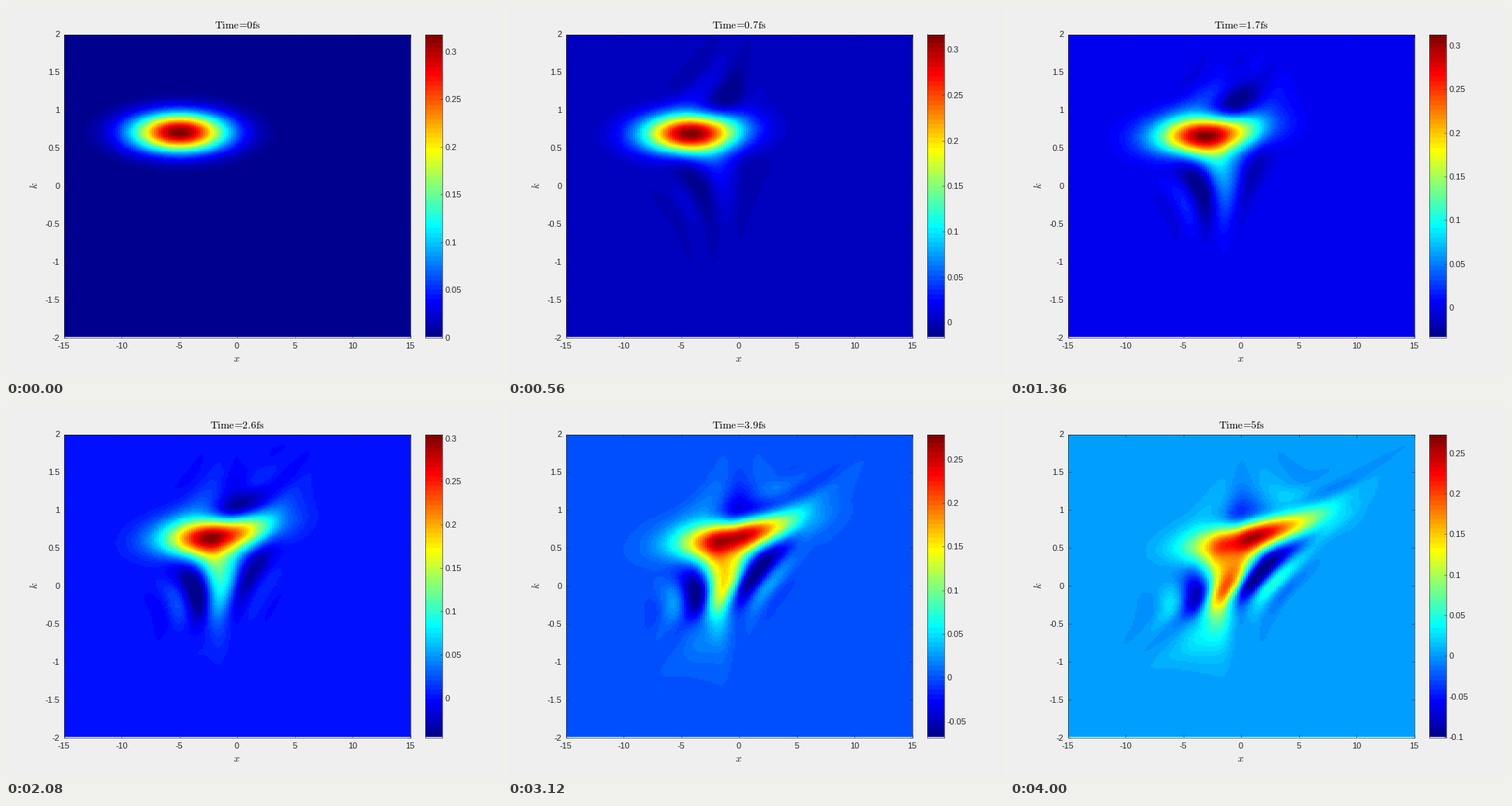
Write a matplotlib script that moves like this. It is 640 px wide and 480 px high and loops after 4080 ms.

```python
import numpy as np
import matplotlib.pyplot as plt
from matplotlib.animation import FuncAnimation
from matplotlib.colors import ListedColormap

W, H, DPI = 640, 480, 100
FRAMES, STEP_MS = 51, 80
INK = (0.15, 0.15, 0.15)


def pt(px):
    return px * 72 / DPI


plt.rcParams.update({
    "font.family": "Liberation Sans",
    "font.size": pt(11),
    "mathtext.fontset": "cm",
    "axes.unicode_minus": False,
    "axes.linewidth": pt(0.6),
    "axes.edgecolor": INK,
})

# Wave packet in nm and fs, effective mass 0.067, smooth barrier in eV
HBAR = 0.6582
C = 0.115768 / 0.067
A, X0, K0 = 4.0, -5.0, 0.7
HEIGHT, SIGMA = 0.36, 0.85
N, DX = 1024, 0.1
SUB = 20
DT = 0.1 / SUB

x = (np.arange(N) - N // 2) * DX
q = 2 * np.pi * np.fft.fftfreq(N, DX)
barrier = HEIGHT * np.exp(-x**2 / (2 * SIGMA**2))
half_v = np.exp(-0.5j * barrier * DT / HBAR)
kinetic = np.exp(-0.5j * C * q**2 * DT)

# Phase-space cells: 0.2 wide, 0.02 high
cols = np.arange(363, 363 + 300, 2)
k = np.arange(-1.99, 2, 0.02)
lag = np.arange(251)
wave = np.exp(-2j * DX * np.outer(lag, k)) * (2 * DX / np.pi)
wave[0] /= 2
ahead = cols[:, None] + lag
behind = cols[:, None] - lag


def wigner(psi):
    pairs = psi[ahead] * psi[behind].conj()
    return (pairs @ wave).real.T


def evolve():
    psi = np.exp(-(x - X0)**2 / (2 * A**2) + 1j * K0 * x)
    psi /= np.sqrt(A * np.sqrt(np.pi))
    out = [wigner(psi)]
    for _ in range(FRAMES - 1):
        for _ in range(SUB):
            psi = half_v * np.fft.ifft(kinetic * np.fft.fft(half_v * psi))
        out.append(wigner(psi))
    return out


fields = evolve()

# Colour range over time
knots = [0, 0.7, 1.7, 2.6, 3.4, 4.3, 5]
times = np.arange(FRAMES) / 10
lows = np.interp(times, knots,
                 [0, -0.0162, -0.0342, -0.0451, -0.0553, -0.0789, -0.1004])
highs = np.interp(times, knots,
                  [0.3183, 0.317, 0.3129, 0.3045, 0.2877, 0.2715, 0.273])


def ramp(up, down):
    i = np.arange(64)
    return np.clip(np.minimum((i - up) / 16, (down - i) / 16), 0, 1)


jet = ListedColormap(np.column_stack([ramp(23, 71), ramp(7, 55), ramp(-9, 39)]))

fig = plt.figure(figsize=(W / DPI, H / DPI), dpi=DPI, facecolor=(0.937,) * 3)


def panel(left, top, right, bottom):
    return fig.add_axes([left / W, 1 - bottom / H,
                         (right - left) / W, (bottom - top) / H])


def label(px, py, text, size, **kw):
    return fig.text(px / W, 1 - py / H, text, fontsize=pt(size),
                    ha="center", va="center", **kw)


ax = panel(74.5, 36.5, 521.5, 427.5)
img = ax.imshow(fields[0], cmap=jet, origin="lower", aspect="auto",
                extent=(-15, 15, -2, 2), interpolation="nearest")
xt = np.arange(-15, 16, 5)
yt = np.arange(-2, 2.1, 0.5)
ax.set_xticks(xt, [f"{v:g}" for v in xt])
ax.set_yticks(yt, [f"{v:g}" for v in yt])
ticks = dict(direction="in", color=INK, labelcolor=INK, width=pt(0.5))
ax.tick_params(axis="x", top=True, length=pt(4), pad=pt(7), **ticks)
ax.tick_params(axis="y", right=True, length=pt(4), pad=pt(5), **ticks)

bar = panel(540.5, 36.5, 562.5, 427.5)
strip = bar.imshow(np.arange(64)[:, None], cmap=jet, origin="lower",
                   aspect="auto", extent=(0, 1, 0, 1), interpolation="nearest")
bar.set_xticks([])
bar.yaxis.tick_right()
bar.tick_params(axis="y", length=pt(3), pad=pt(4.5), **ticks)

title = label(298.5, 25, "", 13.5, color="black")
label(298, 455, "$x$", 13.5, color=INK)
label(37, 231.5, "$k$", 13.5, color=INK, rotation=90)


def draw(n):
    lo, hi = lows[n], highs[n]
    img.set_data(fields[n])
    img.set_clim(lo, hi)
    strip.set_extent((0, 1, lo, hi))
    bar.set_ylim(lo, hi)
    marks = [m / 20 for m in range(-2, 7) if lo <= m / 20 <= hi]
    bar.set_yticks(marks, [f"{m:g}" for m in marks])
    title.set_text(rf"$\mathrm{{Time\!=\!{n / 10:g}fs}}$")
    return img, strip, title


anim = FuncAnimation(fig, draw, frames=FRAMES, interval=STEP_MS,
                     init_func=lambda: draw(0), repeat=True)
plt.show()
```
